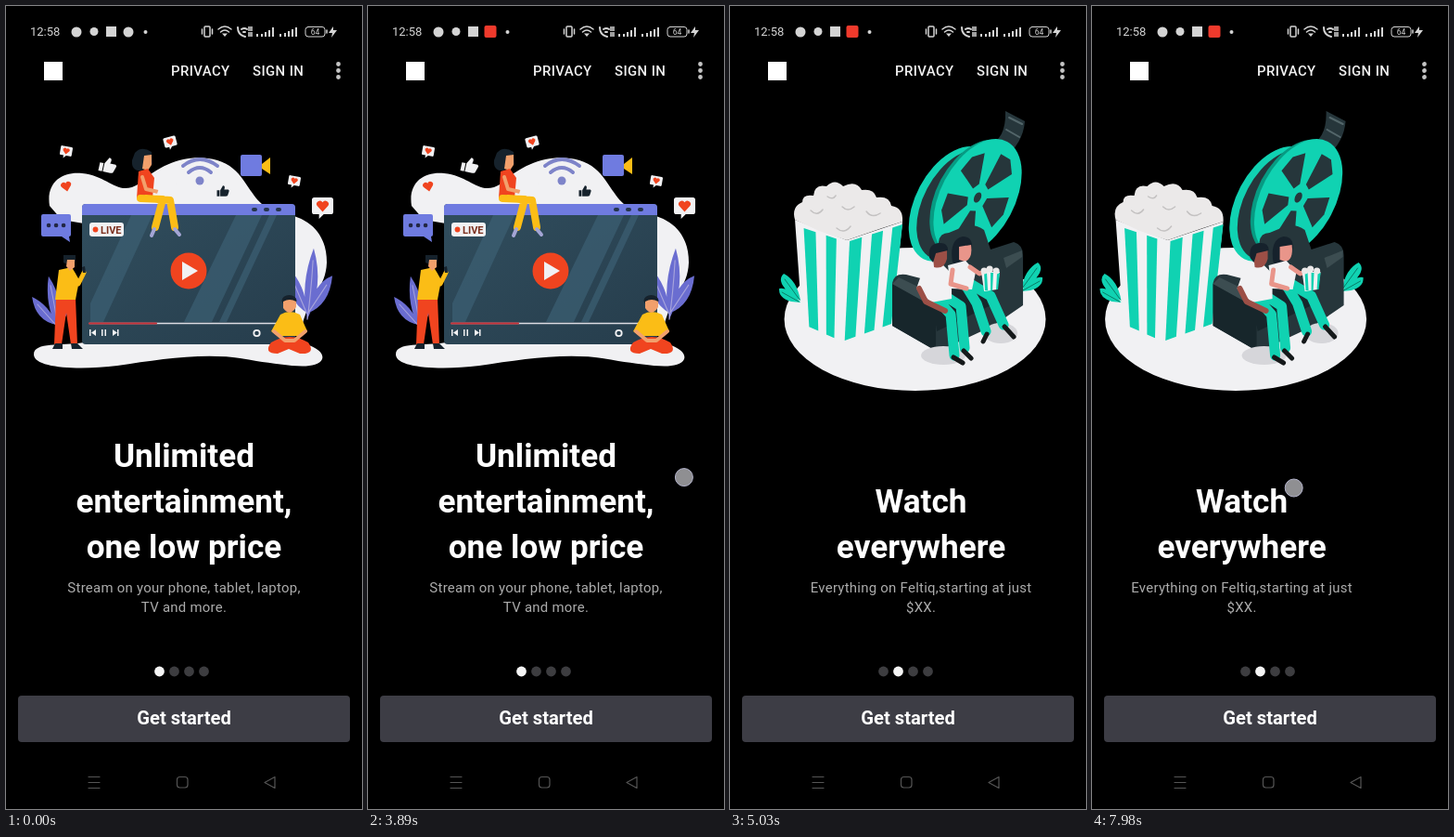
Animation, 384 px wide and 864 px high, one loop 8000 ms. Source, as an HTML page:

```html
<!DOCTYPE html>
<html lang="en">
<head>
<meta charset="utf-8">
<title>Streaming onboarding</title>
<style>
  html, body { margin: 0; width: 100%; height: 100%; overflow: hidden; background: #000; }
  svg { display: block; width: 100%; height: 100%; }
  text { font-family: Roboto, sans-serif; fill: #fff; }
  .title { font-size: 35.2px; font-weight: 700; text-anchor: middle; }
  .body { font-size: 14.93px; letter-spacing: .267px; text-anchor: middle; fill: #acacac; }
  .menu { font-size: 14.93px; font-weight: 500; letter-spacing: .4px; fill: #f0f0f0; }
  .status { fill: #d4d4d4; }
  .white { fill: #f1f1f3; }
  .blue { fill: #6f7be0; }
  .red { fill: #f0441f; }
  .yellow { fill: #fbbd16; }
  .skin { fill: #f2a06c; }
  .ink { fill: #16222c; }
  .slate { fill: #26363b; }
  .teal { fill: #10d2b2; }
  .line { fill: none; stroke-linecap: round; stroke-linejoin: round; }
</style>
</head>
<body>
<svg viewBox="0 0 384 864">
  <defs>
    <g id="like">
      <path class="white" d="M-7-7H7Q9-7 9-5V5Q9 7 7 7H1L-3 11V7H-7Q-9 7-9 5V-5Q-9-7-7-7Z"/>
      <path class="red" d="M0 5L-4.6 0A2.6 2.6 0 0 1 0-3A2.6 2.6 0 0 1 4.6 0Z"/>
    </g>
    <path id="thumb" d="M-9-1H-5V8H-9ZM-4-1L0-8Q4-8 2-2H8Q10-1 9 1L7 7Q6 8 4 8H-4Z"/>
    <g id="plant">
      <path d="M0 0Q-9-28 2-58Q14-28 0 0M0-5Q-22-14-20-40Q-4-28 0-5M0-5Q4-30 21-37Q20-13 0-5" fill="#6a6dd0"/>
      <path class="line" d="M0 0Q2-20 2-48M-1-5L-16-31M1-6L16-29" stroke="#a7a4dc"/>
    </g>
    <g id="sprig">
      <path class="teal" d="M0 0Q-4-22-18-29Q-26-22-14-10ZM0 2Q-11-15-23-13Q-24-3-10 1Z"/>
      <path class="line" d="M-1-1L-17-23M-2 1L-20-9" stroke="#087d68"/>
    </g>
    <linearGradient id="glass" x2="1" y2="1">
      <stop stop-color="#314e5e"/><stop offset="1" stop-color="#263d4c"/>
    </linearGradient>
  </defs>

  <g id="first">
    <path class="white" d="M47 215C43 190 60 178 82 180C112 183 120 206 144 191C168 168 200 158 228 166C262 176 260 212 292 222C328 226 346 245 346 276C345 305 326 310 318 350H90V235L60 230Z"/>
    <path class="white" d="M30 375C30 361 60 366 84 362H300C330 361 344 372 341 380C335 393 300 386 270 382C220 371 170 380 120 387C80 392 30 390 30 375Z"/>
    <use href="#plant" transform="translate(56 348) rotate(-12)"/>
    <use href="#plant" transform="translate(325 337) scale(1.15 1.32) rotate(4)"/>
    <rect x="82" y="213" width="230" height="151" rx="4" fill="url(#glass)"/>
    <path fill="#3c6074" d="M135 225H158L105 340H91V320ZM248 225H276L222 340H192ZM284 225H292L238 340H230Z" opacity=".7"/>
    <path class="blue" d="M82 225V217Q82 213 86 213H308Q312 213 312 217V225Z"/>
    <path class="line" d="M267 219h2M280 219h2M293 219h2" stroke="#26364b" stroke-width="4"/>
    <rect class="white" x="90" y="233" width="37" height="15" rx="3"/>
    <circle class="red" cx="96.500" cy="240.500" r="2.900"/>
    <text x="102" y="244.500" font-size="11" font-weight="700" style="fill:#7c301e">LIVE</text>
    <circle class="red" cx="197" cy="285" r="19.500"/>
    <path class="white" d="M190 275L207 285L190 295Z"/>
    <path class="line" d="M90 341.500H300" stroke="#dcdce2" stroke-width="1.500"/>
    <path class="line" d="M90 341.500H162" stroke="#c6333a" stroke-width="2"/>
    <path class="white" d="M90 348h1.500v7H90ZM97 348v7l-5-3.500ZM103 348h1.500v7H103ZM106.500 348h1.500v7h-1.500ZM115 348l5 3.500-5 3.500ZM120 348h1.500v7H120Z"/>
    <circle cx="270.500" cy="352" r="3.200" fill="none" stroke="#f1f1f3" stroke-width="1.800"/>

    <g class="line" stroke="#7e84c9" stroke-width="4">
      <path d="M191 172Q209 158 228 172M197 179Q209 169 221 179"/>
    </g>
    <circle cx="209" cy="188" r="4.500" fill="#7e84c9"/>
    <rect class="blue" x="253" y="160" width="23" height="23" rx="2"/>
    <path class="yellow" d="M276 170L285 163V181L276 175Z"/>
    <use href="#like" transform="translate(65 156) rotate(10) scale(.72)"/>
    <use href="#like" transform="translate(177 146) rotate(-15) scale(.76)"/>
    <use href="#like" transform="translate(311 188) rotate(10) scale(.72)"/>
    <use href="#like" transform="translate(65 194) rotate(-12) scale(1.1)"/>
    <use href="#like" transform="translate(341.500 215) scale(1.28)"/>
    <use href="#thumb" class="white" transform="translate(110 171) rotate(12)"/>
    <use href="#thumb" class="ink" transform="translate(234 199) scale(.72)"/>
    <path class="blue" d="M40 224H68Q70 224 70 226V246Q70 248 68 248L69 254L60 248H40Q38 248 38 246V226Q38 224 40 224Z"/>
    <path class="line" d="M46 236h.1M54 236h.1M62 236h.1" stroke="#222744" stroke-width="4.500"/>

    <!-- woman with laptop -->
    <path class="ink" d="M139 158Q146 150 157 157L158 170L146 177Q135 178 136 166Z"/>
    <path class="skin" d="M149 161L157 160V171L153 177L147 175Z"/>
    <path class="red" d="M143 178L153 175L160 185L158 207H141Z"/>
    <path class="line" d="M147 184L151 197L164 200" stroke="#f2a06c" stroke-width="4"/>
    <path class="white" d="M162 205L167 190H184L179 206Z"/>
    <path class="line" d="M145 207L169 208L161 238M151 207L177 209L182 238" stroke="#fbbd16" stroke-width="8"/>
    <path class="line" d="M160 240L157 247M182 240L187 246" stroke="#a4a5d5" stroke-width="4"/>

    <!-- standing man -->
    <path class="red" d="M54 314H75L77 364H70L65 330L60 364H52Z"/>
    <path class="yellow" d="M57 284L71 281L79 295L75 316H53Z"/>
    <path class="line" d="M72 288L78 299L84 287" stroke="#fbbd16" stroke-width="5"/>
    <path class="ink" d="M62 268H75V275L66 278L62 276ZM53 363H61V369H50ZM70 363H77L83 369H71ZM82 281L85 280L86 287H83Z"/>
    <path class="skin" d="M66 273H74V281L69 285L65 280Z"/>

    <!-- seated man -->
    <path class="yellow" d="M296 332Q306 326 317 332L325 350L317 355H293L286 350Z"/>
    <path class="red" d="M286 362Q306 350 326 362Q335 375 317 374L305 369L293 374Q277 374 286 362Z"/>
    <path class="line" d="M289 350L301 360H311L323 350" stroke="#f2a06c" stroke-width="4"/>
    <ellipse class="ink" cx="305.500" cy="317" rx="8" ry="6"/>
    <path class="skin" d="M299 318Q306 314 313 318V324Q306 335 299 325Z"/>

    <text class="title" x="192" y="496">Unlimited</text>
    <text class="title" x="192" y="545">entertainment,</text>
    <text class="title" x="192" y="594">one low price</text>
    <text class="body" x="192" y="631">Stream on your phone, tablet, laptop,</text>
    <text class="body" x="192" y="652">TV and more.</text>
  </g>

  <g id="second">
    <ellipse class="white" cx="185.500" cy="337" rx="141" ry="77"/>
    <use href="#sprig" transform="translate(62 317)"/>
    <use href="#sprig" transform="translate(300 305) scale(-1 1)"/>
    <path class="slate" d="M263 150Q284 145 283 113L304 124Q302 148 281 164Z"/>
    <path class="line" d="M287 120L301 127M284 133L298 141M276 145L289 154" stroke="#53666a" stroke-width="2"/>
    <g transform="translate(253 206) rotate(28)">
      <g transform="rotate(-28) translate(-27 7) rotate(28)">
        <ellipse class="teal" rx="40" ry="67"/>
        <ellipse class="slate" cx="6" cy="-2" rx="38" ry="64"/>
      </g>
      <ellipse fill="#079a82" cx="-4" cy="2" rx="40" ry="67"/>
      <ellipse class="teal" rx="40" ry="68"/>
      <g id="reel" class="slate" transform="scale(40 68)"></g>
      <ellipse class="slate" rx="3.500" ry="6"/>
    </g>

    <path class="white" d="M56 230L112 252L172 232L160 342L107 361L64 342Z"/>
    <g id="stripes" class="teal"></g>
    <path d="M56 230Q52 216 64 211Q64 202 76 204Q77 191 90 194Q99 185 108 194Q122 187 128 198Q141 196 144 206Q158 204 160 215Q173 217 172 232L150 239L112 252L82 242Z" fill="#ebe9e9"/>
    <path class="line" d="M73 220q7 7 13-1M101 239q8 7 15-2M107 216q6 6 13 0M133 221q6 8 15 2M91 205q6 4 9-1" stroke="#c4c2c2" stroke-width="1.500"/>

    <!-- sofa -->
    <path class="slate" d="M211 254Q212 244 222 244L239 237Q250 234 260 241L267 262L292 254Q302 257 302 268V322L270 344L210 372L161 344V298Q163 287 176 289L211 298Z"/>
    <path d="M161 299L208 325V371L161 344ZM214 300L276 318L209 350L205 321Z" fill="#17262b"/>
    <path d="M168 292L205 310L208 325L161 299ZM281 271L301 263V270L284 282Z" fill="#3c4d51"/>
    <ellipse cx="216" cy="376" rx="24" ry="10" fill="#d6d6da"/>
    <ellipse cx="278" cy="352" rx="18" ry="11" fill="#d6d6da"/>

    <!-- couple -->
    <path class="line" d="M218 312L235 323L239 368M209 315L224 332L228 376M241 302L252 320L262 350M247 300L267 312L281 343" stroke="#10d2b2" stroke-width="11"/>
    <path class="line" d="M238 371L246 379M227 378L237 384M263 353L259 361M282 345L292 356" stroke="#15191a" stroke-width="5"/>
    <path class="white" d="M194 284L216 279L225 288V315L203 319L187 304Z"/>
    <path class="line" d="M190 304L197 318L218 328" stroke="#9c4f46" stroke-width="6"/>
    <path d="M204 262H220V272Q217 284 206 281Z" fill="#9c4f46"/>
    <path class="ink" d="M201 271Q199 256 211 255Q221 254 221 263L208 266L205 276Z"/>
    <path class="ink" d="M226 276Q222 251 237 248Q248 248 247 261L234 282Z"/>
    <path d="M233 259L246 257Q248 273 239 275L233 273Z" fill="#e9958a"/>
    <path class="white" d="M221 279L240 274L251 286L247 305L224 304Z"/>
    <path class="line" d="M226 284L224 299L241 304M245 281L255 288L263 285" stroke="#e9958a" stroke-width="5"/>
    <path class="white" d="M257 286L277 286L274 305L260 307Z"/>
    <path class="teal" d="M260 287h3l1 19h-3ZM267 287h3l-1 19h-2ZM274 287h3l-2 18h-2Z"/>
    <path class="line" d="M260 285h.1M266 283h.1M273 285h.1" stroke="#ebe9e9" stroke-width="7"/>

    <text class="title" x="192" y="545">Watch</text>
    <text class="title" x="192" y="594">everywhere</text>
    <text class="body" x="192" y="631">Everything on Feltiq,starting at just</text>
    <text class="body" x="192" y="652">$XX.</text>
  </g>

  <!-- status bar -->
  <text class="status" x="26" y="32" font-size="13">12:58</text>
  <g class="status">
    <circle cx="76" cy="28" r="5.500"/>
    <circle cx="95" cy="27.500" r="4.500"/>
    <rect x="108" y="22" width="11" height="11"/>
    <circle cx="150.500" cy="28" r="2"/>
    <path d="M270 30h2v3h-2ZM275 30h2v3h-2ZM279 28h2v5h-2ZM283 26h2v7h-2ZM287 23h2v10h-2ZM295 30h2v3h-2ZM300 29h2v4h-2ZM304 27h2v6h-2ZM308 25h2v8h-2ZM312 23h2v10h-2Z"/>
    <path d="M353 22L348 29H352L351 34L357 26H353ZM236 33L233 29.500H239Z"/>
    <path d="M261 22h5v5h-5ZM261 28h5v5h-5Z" opacity=".75"/>
  </g>
  <g class="line" stroke="#d4d4d4" stroke-width="1.500">
    <rect x="214" y="22" width="6" height="11" rx="1"/>
    <path d="M211.500 25V30M222.500 25V30M229 25Q236 19 243 25M231.500 28Q236 24 240.500 28"/>
    <path d="M250 23Q250 31 258 33M254 25Q257 23 260 25M256 28h2" stroke-width="2"/>
    <rect x="323" y="22.500" width="21" height="10.500" rx="3" stroke-width="1"/>
    <path d="M346 26V29"/>
  </g>
  <text class="status" x="333.500" y="31" font-size="8.500" text-anchor="middle">64</text>
  <circle id="oldNotice" class="status" cx="132" cy="28" r="5.500"/>
  <rect id="newNotice" fill="#f03a2c"/>

  <!-- app bar -->
  <rect x="41" y="60" width="20" height="20" fill="#fff"/>
  <text class="menu" x="178" y="75">PRIVACY</text>
  <text class="menu" x="266" y="75">SIGN IN</text>
  <path class="line" d="M358.500 62.500v.1M358.500 69.500v.1M358.500 76.500v.1" stroke="#c4c4c4" stroke-width="4.800"/>

  <g id="dots"></g>
  <rect x="13" y="742" width="358" height="50" rx="4" fill="#3d3d45"/>
  <text x="192" y="773" font-size="20.200" font-weight="700" text-anchor="middle">Get started</text>
  <g class="line" stroke="#555" stroke-width="1.200">
    <path d="M89 829.500H101M89 835.500H101M89 841.500H101M290 829.500V841.500L279 835.500Z"/>
    <rect x="184.500" y="829.500" width="11.500" height="11.500" rx="3"/>
  </g>
  <circle id="touch" r="9.500" fill="#a8a8ac" fill-opacity=".85" stroke="#b4b4cc"/>
</svg>
<script>
const LOOP = 8000, PAGE = 384, DRAG = 420, DRAG_DISTANCE = 181;
const SWIPES = [3890, 7820];
const $ = id => document.getElementById(id);
const set = (el, attrs) => { for (const k in attrs) el.setAttribute(k, attrs[k]); };

function add(parent, tag, attrs) {
  const el = document.createElementNS('http://www.w3.org/2000/svg', tag);
  set(el, attrs);
  parent.append(el);
  return el;
}

const mix = (a, b, u) => a.map((v, i) => v + (b[i] - v) * u);

function stripe(topA, topB, lowA, lowB, from, to) {
  const points = [mix(topA, topB, from), mix(topA, topB, to), mix(lowA, lowB, to), mix(lowA, lowB, from)];
  add($('stripes'), 'polygon', { points: points.join(' ') });
}
for (const [from, to] of [[.17, .4], [.6, .8]])
  stripe([56, 236], [112, 254], [64, 342], [107, 361], from, to);
for (const [from, to] of [[.05, .27], [.45, .65], [.82, 1]])
  stripe([112, 254], [172, 235], [107, 361], [160, 342], from, to);

const polar = (r, angle) => [r * Math.cos(angle), r * Math.sin(angle)];
for (let i = 0; i < 5; i++) {
  const a = i * Math.PI * .4 - 1.2;
  const points = [polar(.24, a - .3), polar(.78, a - .36), polar(.83, a), polar(.78, a + .36), polar(.24, a + .3)];
  add($('reel'), 'polygon', { points: points.join(' ') });
}

const dots = [0, 1, 2, 3].map(i => add($('dots'), 'circle', { cx: 165.5 + 16 * i, cy: 716, r: 5.4 }));

const dragged = ms => DRAG_DISTANCE * Math.pow(ms / DRAG, 1.86);

function scrollAt(t) {
  const [first, second] = SWIPES, released = first + DRAG;
  if (t < first) return 0;
  if (t < released) return dragged(t - first);
  if (t < 6100) return PAGE - (PAGE - DRAG_DISTANCE) * Math.exp((released - t) / 270);
  return PAGE + (t < second ? 0 : dragged(t - second));
}

function draw(t) {
  const scroll = scrollAt(t);
  set($('first'), { transform: `translate(${-scroll} 0)` });
  set($('second'), { transform: `translate(${PAGE - scroll} 0)` });
  const active = Math.round(scroll / PAGE);
  dots.forEach((dot, i) => set(dot, { fill: i === active ? '#f4f4f4' : '#3d3d40' }));

  const start = SWIPES.find(s => t > s && t < s + DRAG + 40);
  const u = Math.min(1, (t - start) / DRAG);
  set($('touch'), start === undefined ? { visibility: 'hidden' } : {
    visibility: 'visible',
    cx: 342 - 169 * (1 - Math.pow(1 - u, 2.75)),
    cy: 507 + 30 * u
  });

  const swapped = t >= 700, size = t < 1690 ? 11 : 13;
  set($('oldNotice'), { visibility: swapped ? 'hidden' : 'visible' });
  set($('newNotice'), {
    visibility: swapped ? 'visible' : 'hidden',
    x: 132 - size / 2, y: 27.5 - size / 2, width: size, height: size, rx: 2
  });
}

function tick() {
  draw(performance.now() % LOOP);
  requestAnimationFrame(tick);
}
tick();
</script>
</body>
</html>
```
